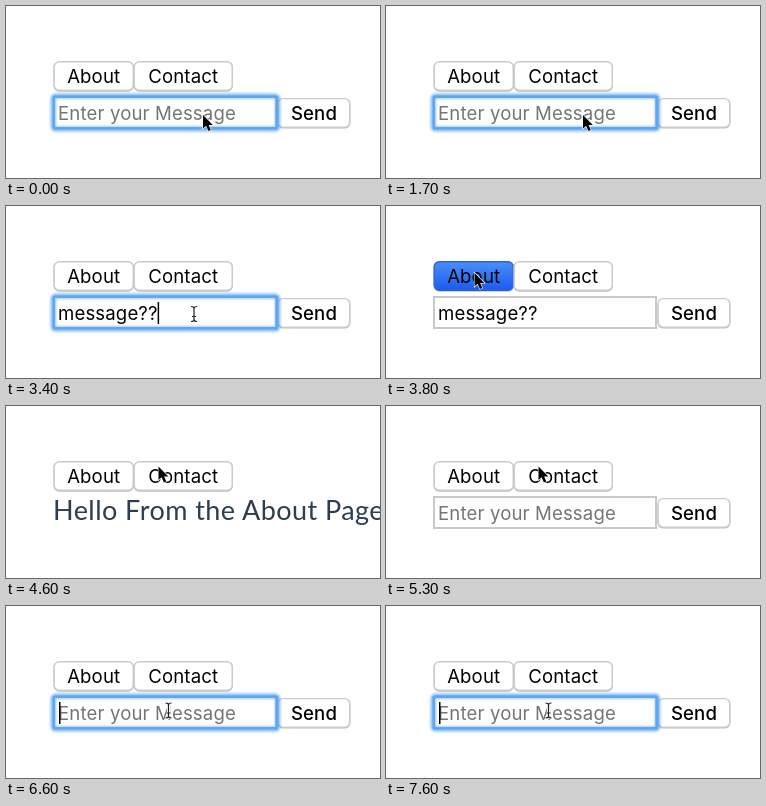
An HTML page that plays this animation: 374 by 172 pixels, repeating every 7700 ms.

```html
<!DOCTYPE html>
<html lang="en">
<meta charset="utf-8">
<title>Form and pages</title>
<style>
html, body { margin: 0; width: 100%; height: 100%; overflow: hidden; background: #fff; }
svg { display: block; }
text { font: 18.6px Inter, sans-serif; letter-spacing: .13px; white-space: pre; }
.button text { text-anchor: middle; }
.button rect { fill: #fff; stroke: #cbcbcb; stroke-width: 1.4; }
.button .shadow { fill: #bdbdbd; stroke: #bdbdbd; }
.pressed rect { fill: url(#blue); stroke: #2d62d8; }
#form .button text { font-weight: 500; }
#heading { font: 27px Lato, sans-serif; letter-spacing: .45px; fill: #2c3e50; }
#ring rect { fill: none; stroke: #58a4f4; }
</style>
<svg width="374" height="172" viewBox="0 0 374 172">
  <defs>
    <linearGradient id="blue" x2="0" y2="1">
      <stop stop-color="#4b8ff9"/><stop offset="1" stop-color="#1a5bee"/>
    </linearGradient>
    <filter id="soft" x="-5%" y="-30%" width="110%" height="160%"><feGaussianBlur stdDeviation=".9"/></filter>
  </defs>
  <g id="buttons"></g>
  <g id="form">
    <rect id="field" x="48" y="91" width="222" height="31" fill="#fff" stroke="#c9c9c9" stroke-width="2"/>
    <g id="ring">
      <rect x="47.2" y="90" width="224.4" height="33" rx="2.5" stroke-width="5.6" opacity=".65" filter="url(#soft)"/>
      <rect x="47.7" y="90.6" width="223.4" height="31.8" rx="1.5" stroke-width="2.6" opacity=".8"/>
    </g>
    <text id="message" x="52" y="114"></text>
    <rect id="caret" y="96" width="1.5" height="22"/>
  </g>
  <text id="heading" x="47" y="114">Hello From the About Page</text>
  <path id="arrow" d="M0 0V13.6L3.1 10.8L5.4 16L7.8 15L5.6 9.9H9.8Z" stroke="#fff" stroke-width="1.2" paint-order="stroke"/>
  <g id="beam" fill="none">
    <path d="M-3-7.5Q0-7.5 0-5.5Q0-7.5 3-7.5M0-5.5V5.5M-3 7.5Q0 7.5 0 5.5Q0 7.5 3 7.5M-2 2.5H2" stroke="#fff" stroke-width="3"/>
    <path d="M-3-7.5Q0-7.5 0-5.5Q0-7.5 3-7.5M0-5.5V5.5M-3 7.5Q0 7.5 0 5.5Q0 7.5 3 7.5M-2 2.5H2" stroke="#222" stroke-width="1.2"/>
  </g>
</svg>
<script>
const LOOP = 7700, STEP = 100;
const $ = id => document.getElementById(id);
const show = (node, on) => node.style.display = on ? '' : 'none';
const between = (t, a, b) => t >= a && t < b;

function addButton(parent, label, x, y, width) {
  parent.insertAdjacentHTML('beforeend', `<g class="button">
    <rect class="shadow" x="${x}" y="${y + .7}" width="${width}" height="28.6" rx="5"/>
    <rect x="${x}" y="${y}" width="${width}" height="28.6" rx="5"/>
    <text x="${x + width / 2}" y="${y + 21.4}">${label}</text></g>`);
  return parent.lastElementChild;
}
const about = addButton($('buttons'), 'About', 48.2, 55.7, 79);
const contact = addButton($('buttons'), 'Contact', 128.2, 55.7, 98);
const send = addButton($('form'), 'Send', 272.2, 92.6, 71.5);
$('form').insertBefore(send, $('ring'));

const typed = 'message??';
const keyTimes = [2000, 2200, 2400, 2600, 2700, 2800, 2900, 3000, 3200];

// Each move: start, end, from x, y, to x, y
const moves = [
  [0, 0, 197, 109, 197, 109],
  [3400, 3700, 188, 108, 88.5, 67],
  [4100, 4600, 88.5, 67, 152.5, 60.5],
  [5800, 6200, 152.5, 60.5, 162.5, 104.5],
];
function pointer(t) {
  const [start, end, x0, y0, x1, y1] = moves.findLast(m => t >= m[0]);
  const p = end > start ? Math.min(1, (t - start) / (end - start)) : 1;
  const k = p * p * (3 - 2 * p);
  return [x0 + (x1 - x0) * k, y0 + (y1 - y0) * k];
}

function caretOn(t) {
  if (between(t, 2000, 3700)) return true;
  if (t < 2000) return (t + 300) % 1000 >= 500;
  return between(t, 6600, 7100) || t >= 7600;
}

function draw(t) {
  const onAbout = between(t, 4000, 5200);
  const text = typed.slice(0, t < 5200 ? keyTimes.filter(k => k <= t).length : 0);
  const focused = t < 3800 || t >= 6600;

  about.classList.toggle('pressed', between(t, 3800, 4000));
  contact.classList.toggle('pressed', between(t, 5000, 5200));
  show($('form'), !onAbout);
  show($('heading'), onAbout);
  show($('ring'), focused);
  show($('caret'), caretOn(t));

  const message = $('message');
  message.textContent = text || 'Enter your Message';
  message.setAttribute('fill', text ? '#000' : '#757575');
  const end = text && !onAbout ? message.getComputedTextLength() : 0;
  $('caret').setAttribute('x', text ? 52 + end : 53);

  const [x, y] = pointer(t);
  const visible = !between(t, 2000, 3400);
  const overField = t > 2000 && !onAbout && y > 90;
  show($('arrow'), visible && !overField);
  show($('beam'), visible && overField);
  for (const id of ['arrow', 'beam']) $(id).setAttribute('transform', `translate(${x} ${y})`);
}

const began = performance.now();
function tick() {
  const t = (performance.now() - began) % LOOP;
  draw(Math.floor(t / STEP) * STEP);
  requestAnimationFrame(tick);
}
tick();
</script>
</html>
```
